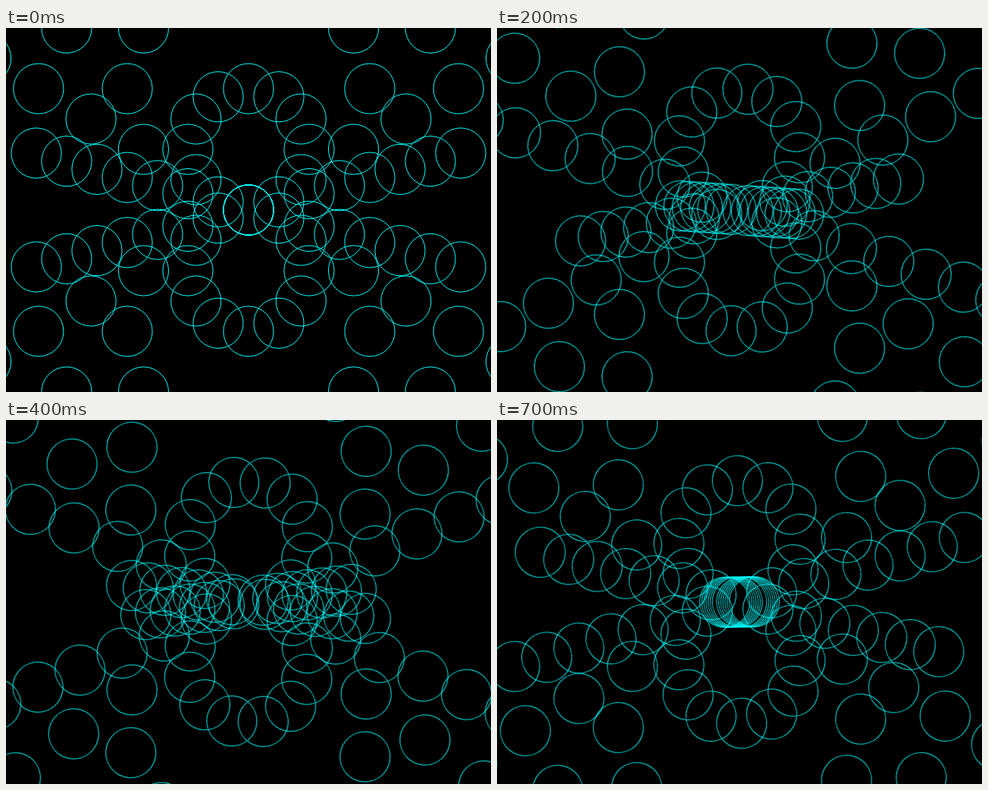
Write an HTML page that moves like this. It is 640 px wide and 480 px high and loops after 0.75 s.

```html
<!DOCTYPE html>
<html lang="en">
<head>
<meta charset="utf-8">
<title>Rotating rings</title>
<style>
  html, body { margin: 0; width: 100%; height: 100%; overflow: hidden; background: #000; }
  svg { display: block; width: 640px; height: 480px; }
  circle { fill: none; stroke: #0ff; stroke-width: 1; }
  .ring { transform-origin: 0 0; animation: turn 750ms steps(15) infinite; }
  @keyframes turn { to { transform: rotate(30deg); } }
</style>
</head>
<body>
<svg id="stage" viewBox="0 0 640 480"></svg>
<script>
  const NS = 'http://www.w3.org/2000/svg';
  const STEP = 80, RINGS = 7, BEADS = 12, BEAD_R = 33.1;

  function add(parent, tag, attrs) {
    const el = document.createElementNS(NS, tag);
    for (const key in attrs) el.setAttribute(key, attrs[key]);
    return parent.appendChild(el);
  }

  // Every ring passes through the stage centre, above (-1) or below (1) it.
  function addRing(radius, side) {
    const place = add(stage, 'g', { transform: `translate(320 ${240 + side * radius})` });
    const ring = add(place, 'g', { class: 'ring' });
    for (let i = 0; i < BEADS; i++) {
      const a = i * 2 * Math.PI / BEADS;
      add(ring, 'circle', { cx: radius * Math.cos(a), cy: radius * Math.sin(a), r: BEAD_R });
    }
  }

  const stage = document.getElementById('stage');
  for (let n = 1; n <= RINGS; n++) {
    addRing(n * STEP, -1);
    addRing(n * STEP, 1);
  }
</script>
</body>
</html>
```
